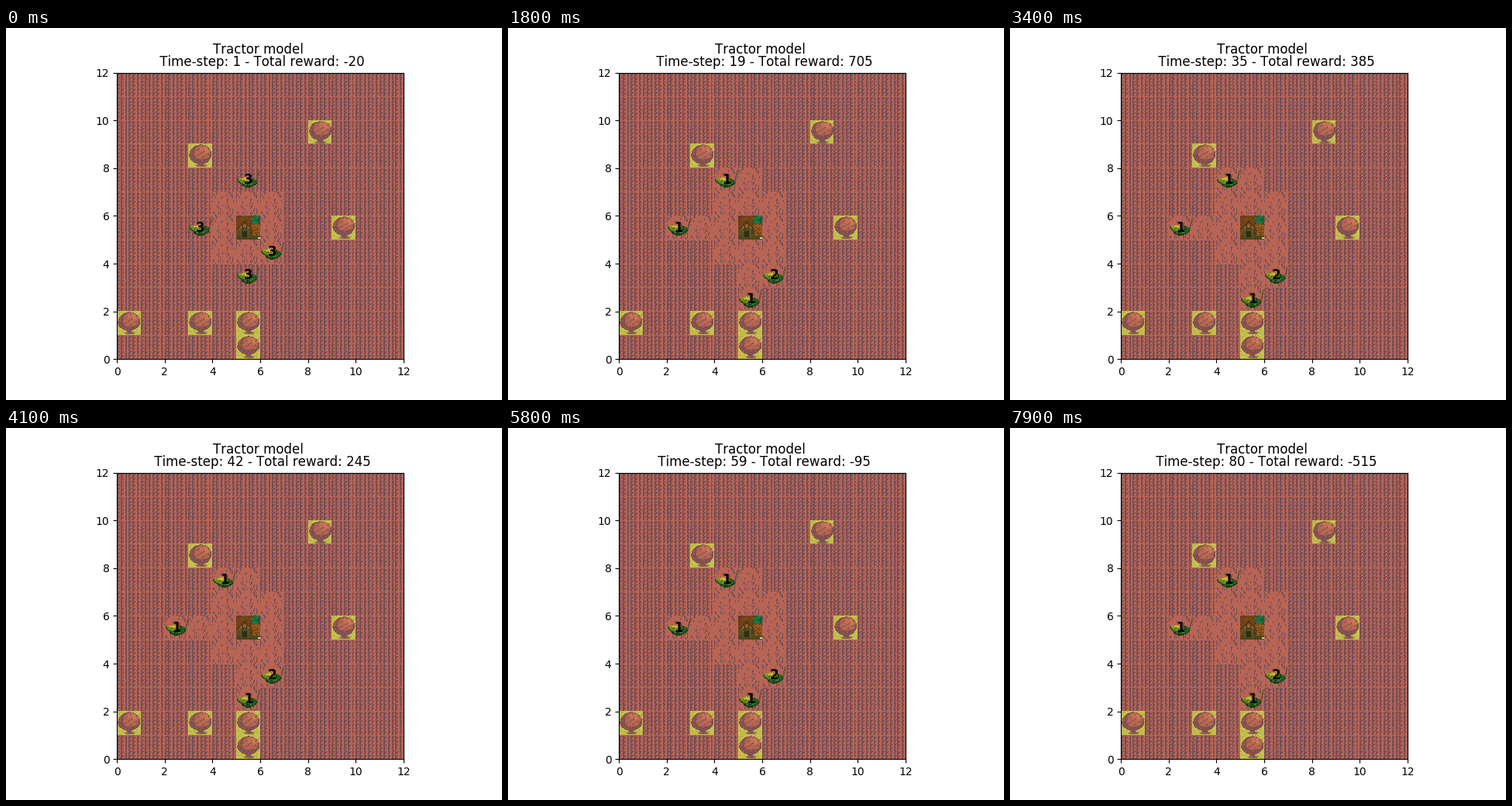
A matplotlib script that plays this animation: 640 by 480 pixels, repeating every 8 s.

```python
import numpy as np
import matplotlib.pyplot as plt
from matplotlib.animation import FuncAnimation

N = 12          # cells per side
S = 32          # texels per cell
STEPS = 80
STEP_COST, CROP_VALUE = 20, 155

SOIL = (184, 100, 84)
SHADE = (116, 76, 84)
GRASS = (200, 196, 78)

TREES = [(0, 1), (3, 1), (5, 1), (5, 0), (3, 8), (8, 9), (9, 5)]
HOME = (5, 5)

# Per tractor: (cell, load) at each of the first steps, the last one stays.
ROUTES = [
    [((5, 7), 3), ((5, 7), 2), ((4, 7), 2), ((4, 7), 1)],
    [((3, 5), 3), ((3, 5), 2), ((2, 5), 2), ((2, 5), 1)],
    [((6, 4), 3), ((6, 3), 3), ((6, 3), 2), ((6, 3), 2)],
    [((5, 3), 3), ((5, 3), 2), ((5, 2), 2), ((5, 2), 1)],
]

rng = np.random.default_rng(7)
V, U = np.mgrid[0:S, 0:S] + 0.5     # row from the top, column
GRAIN = rng.random((S, S))


def tile(color):
    return np.full((S, S, 3), color, dtype=np.uint8)


def ellipse(cx, cy, rx, ry, tilt=0.0):
    c, s = np.cos(tilt), np.sin(tilt)
    x, y = U - cx, V - cy
    return ((x * c + y * s) / rx) ** 2 + ((y * c - x * s) / ry) ** 2 <= 1


def box(x0, y0, x1, y1):
    return (U > x0) & (U < x1) & (V > y0) & (V < y1)


def make_crop():
    img = tile(SOIL)
    row = U % (S / 6)
    stem = (row < 1.9) & (GRAIN > 0.12)
    leaf = (row < 3.6) & ((V + row) % 5 < 2)
    stalk = (stem | leaf) & (V > 1)
    img[stalk] = SHADE
    return img


def make_stubble():
    img = tile(SOIL)
    seed = GRAIN < 0.045
    for drop in range(3):
        img[np.roll(seed, drop, axis=0)] = SHADE
    return img


def make_tree():
    img = tile(GRASS)
    img[GRAIN < 0.25] = (176, 172, 68)
    img[box(13, 24, 20, 31)] = SHADE
    img[ellipse(17, 29.5, 8, 1.8) & (GRAIN > 0.3)] = (140, 104, 72)
    crown = ellipse(16.3, 14.2, 15, 12.8, -0.1)
    lit = crown & ellipse(19, 11, 11.5, 9, -0.45)
    img[crown] = (124, 78, 80)
    img[crown & (GRAIN > 0.75)] = (164, 94, 78)
    img[lit] = (184, 104, 80)
    swirl = np.sin(0.55 * U + 0.9 * V) > 0.55
    img[lit & swirl & (GRAIN < 0.6)] = (142, 84, 78)
    img[ellipse(21, 8, 6.5, 3.5, 0.3) & (GRAIN > 0.45)] = (206, 126, 90)
    return img


def make_home():
    img = tile((120, 70, 24))
    img[GRAIN < 0.25] = (92, 52, 20)
    img[box(20, 0, 32, 11)] = (38, 120, 66)
    img[box(20, 0, 32, 11) & (GRAIN < 0.35)] = (24, 78, 46)
    img[box(21, 11, 32, 28)] = (156, 92, 28)
    img[box(21, 11, 32, 28) & (GRAIN < 0.35)] = (96, 56, 24)
    img[box(0, 27, 32, 32)] = (70, 72, 30)
    img[box(2, 16, 20, 29)] = (92, 84, 36)
    img[box(2, 16, 20, 29) & (GRAIN < 0.3)] = (64, 60, 26)
    roof = np.abs(U - 11) - (V - 8) * 0.95
    img[(roof < 0) & (V < 18)] = (138, 88, 36)
    img[(np.abs(roof) < 1) & (V < 19)] = (60, 50, 22)
    img[box(8, 13, 14, 18)] = (48, 40, 20)
    img[box(9, 14, 13, 17)] = (140, 100, 44)
    img[box(8, 21, 14, 29)] = (56, 42, 20)
    img[box(29, 29, 32, 31)] = (226, 206, 160)
    return img


def make_tractor():
    img = tile((26, 58, 24))
    body = ellipse(15, 18, 14, 5.3, 0.12)
    belly = ellipse(17, 21.5, 10, 5.5, -0.1) & (GRAIN > 0.08)
    tail = (np.abs(U - 31 + (V - 4) * 0.2) < 0.7) & (V > 4) & (V < 18)
    img[body & (GRAIN < 0.5)] = (52, 112, 36)
    img[belly & (V > 22) & (GRAIN > 0.85)] = (58, 110, 38)
    yellow = ellipse(10.5, 16.5, 8, 4.2, 0.25)
    img[yellow & (GRAIN > 0.3)] = (150, 146, 34)
    img[ellipse(13, 14.5, 6, 2.2, 0.1) & (GRAIN > 0.2)] = (200, 180, 46)
    img[tail] = (92, 80, 52)
    return img, body | belly | tail


CROP, STUBBLE = make_crop(), make_stubble()
TREE, HOUSE = make_tree(), make_home()
TRACTOR, MASK = make_tractor()


def at(field, cell):
    x, y = cell
    top = (N - 1 - y) * S
    return field[top:top + S, x * S:(x + 1) * S]


def state(step):
    """Cleared cells, tractors and total reward after a number of steps."""
    cleared = {(x, y) for x in range(4, 7) for y in range(4, 7)}
    crops = 0
    last = min(step, len(ROUTES[0])) - 1
    for route in ROUTES:
        for (_, before), (cell, load) in zip(route[:last], route[1:last + 1]):
            if load < before:
                cleared.add(cell)
                crops += 1
    tractors = [route[last] for route in ROUTES]
    return cleared, tractors, crops * CROP_VALUE - step * STEP_COST


def paint(cleared, tractors):
    field = np.tile(CROP, (N, N, 1))
    for cell in cleared:
        at(field, cell)[:] = STUBBLE
    for cell in TREES:
        at(field, cell)[:] = TREE
    at(field, HOME)[:] = HOUSE
    for cell, _ in tractors:
        at(field, cell)[MASK] = TRACTOR[MASK]
    return field


plt.rcParams["font.family"] = "DejaVu Sans"
plt.rcParams["text.kerning_factor"] = 6
fig, ax = plt.subplots(figsize=(6.4, 4.8), dpi=100)
picture = ax.imshow(np.tile(CROP, (N, N, 1)), extent=(0, N, 0, N),
                    interpolation="nearest")
ax.set_xticks(range(0, N + 1, 2))
ax.set_yticks(range(0, N + 1, 2))
title = ax.set_title("", linespacing=0.88)
labels = [ax.text(0, 0, "", size=12, weight="bold", ha="center", va="center")
          for _ in ROUTES]


def update(i):
    step = i + 1
    cleared, tractors, reward = state(step)
    picture.set_data(paint(cleared, tractors))
    for label, ((x, y), load) in zip(labels, tractors):
        label.set_position((x + 0.5, y + 0.5))
        label.set_text(str(load))
    title.set_text(f"Tractor model \n Time-step: {step} - Total reward: {reward}")
    return [picture, title, *labels]


anim = FuncAnimation(fig, update, frames=STEPS, interval=100, repeat=True,
                     repeat_delay=0, blit=False)
plt.show()
```
